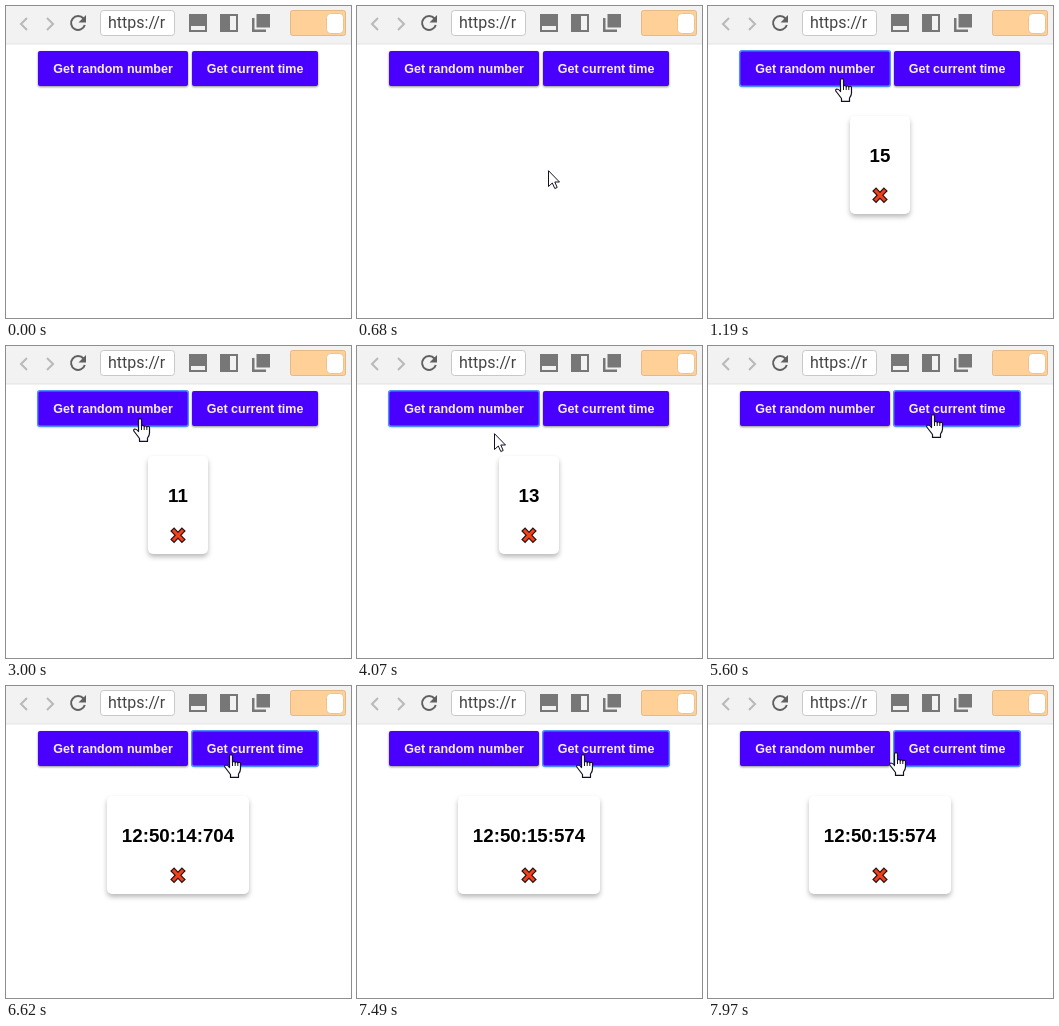
These frames come from a looping animation (345x312 px, 8000 ms). An HTML page:

```html
<!DOCTYPE html>
<html lang="en">
<head>
<meta charset="utf-8">
<style>
  html, body { margin: 0; width: 100%; height: 100%; overflow: hidden; background: #fff; }
  svg { display: block; }
  text { font-family: "Liberation Sans", Arial, sans-serif; font-weight: bold; }
  .url { font: 16px Roboto, sans-serif; fill: #444; }
  .button rect { fill: #4900ff; filter: drop-shadow(0 1px 1.2px rgba(0,0,0,.45)); }
  .button text { font-size: 12.5px; fill: #f3efff; }
  .ring { fill: none; stroke: #4d90fe; stroke-width: 1.4; }
  #card { fill: #fff; filter: drop-shadow(0 3px 2.5px rgba(0,0,0,.27)); }
  #value { font-size: 18.72px; text-anchor: middle; }
  .pointer { fill: #fff; stroke: #111122; stroke-linejoin: round; }
</style>
</head>
<body>
<svg width="345" height="312" viewBox="0 0 345 312">
  <g id="toolbar">
    <path fill="#f2f2f2" d="M0 0H345V38H0z"/>
    <path fill="#e3e3e3" d="M0 37.5H345V38.5H0z"/>
    <g fill="none" stroke-width="2">
      <path stroke="#b9b9b9" d="M21 12l-6 6 6 6M41 12l6 6-6 6"/>
      <path stroke="#606060" d="M77.5 12.5A7 7 0 1 0 78.8 19"/>
    </g>
    <path fill="#606060" d="M80 9v7.5h-7.5z"/>
    <rect x="94.5" y="4.5" width="74" height="25" rx="3" fill="#fff" stroke="#c8c8c8"/>
    <text class="url" x="102" y="22">https://r</text>
    <g fill="#777">
      <path fill-rule="evenodd" d="M183 8h18v18h-18zM185 20v4h14v-4z"/>
      <path fill-rule="evenodd" d="M214 8h18v18h-18zM224 10v14h6V10z"/>
      <path d="M250.500 8H264v13.500h-13.500zM246 12h2.500v11.500H260V26H246z"/>
    </g>
    <rect x="284.500" y="4.500" width="55" height="25" rx="2" fill="#ffd199" stroke="#e3b987"/>
    <rect x="320.500" y="7.500" width="17" height="20" rx="4" fill="#fff" stroke="#edc28d"/>
  </g>

  <g class="button">
    <rect x="32" y="45" width="150" height="35" rx="2"/>
    <text x="47.300" y="67">Get random number</text>
  </g>
  <g class="button">
    <rect x="186" y="45" width="126" height="35" rx="2"/>
    <text x="200.800" y="67">Get current time</text>
  </g>
  <rect class="ring" id="randomRing" x="31.700" y="44.700" width="150.600" height="35.600" rx="2"/>
  <rect class="ring" id="timeRing" x="185.700" y="44.700" width="126.600" height="35.600" rx="2"/>

  <g id="popup">
    <rect id="card" y="110" height="98" rx="5"/>
    <text id="value" x="172" y="156"></text>
    <rect id="closeRing" x="157" y="179" width="30" height="19" rx="1" fill="none" stroke="#9dc2fb" stroke-width="2"/>
    <g stroke-linecap="square">
      <path stroke="#28130f" stroke-width="5.400" d="M168 185l8 8.500M176 185l-8 8.500"/>
      <path stroke="#f0401c" stroke-width="3" d="M168 185l8 8.500M176 185l-8 8.500"/>
    </g>
  </g>

  <g id="cursor">
    <path class="pointer" id="arrow" d="M.5.700V16.500L4.300 13 6.800 18.500 9.200 17.500 6.800 12H11.500z"/>
    <g class="pointer" id="hand" transform="translate(-5)">
      <path stroke-width="1.200" d="M5.500 13.500V2.200a1.500 1.500 0 0 1 3 0V8.500a1.350 1.350 0 0 1 2.700.3a1.350 1.350 0 0 1 2.600.5a1.350 1.350 0 0 1 2.700.8V15q0 2.500-2 5V23.400H6.500V20.500Q5 18.500 3.500 16.500L.8 13q-.5-1.900 1.200-2 1.500 0 3.500 2.500z"/>
      <path fill="none" d="M8.500 8v4M11.200 8.800V12M13.800 9.500V12"/>
    </g>
  </g>
</svg>
<script>
const LOOP = 8000;
const $ = id => document.getElementById(id);
const show = (id, on) => $(id).style.display = on ? "" : "none";

// Moves of the pointer hotspot: start, end, from, to
const moves = [
  [320, 960, [277, 300], [132, 72]],
  [3940, 4540, [132, 72], [176, 193]],
  [4910, 5320, [176, 193], [223, 68]],
  [7279, 7280, [223, 68], [224, 68]],
  [7700, 7970, [224, 68], [186, 66]]
];
const rolls = [[1190, 15], [1880, 11], [2280, 17], [3000, 11], [3380, 18], [3690, 13]];
const clockTicks = [5650, 5960, 6290, 6620, 6900, 7230, 7490];

const latest = (list, t) => list.filter(item => [item].flat()[0] <= t).pop();

function pointerAt(t) {
  const [start, end, from, to] = latest(moves, t) || moves[0];
  const p = Math.max(0, Math.min(1, (t - start) / (end - start)));
  const eased = p * p * (3 - 2 * p);
  return from.map((a, i) => Math.round(a + (to[i] - a) * eased));
}

function clockText(tick) {
  const ms = 15574 + tick - 7490;
  return `12:50:${Math.floor(ms / 1000)}:${String(ms % 1000).padStart(3, "0")}`;
}

function render(t) {
  const isRandom = t >= 1190 && t < 4680, isClock = t >= 5650;
  const popup = isRandom || isClock;
  show("randomRing", t >= 1160 && t < 4580);
  show("closeRing", t >= 4580 && t < 4680);
  show("timeRing", t >= 5600);
  show("popup", popup);
  if (popup) {
    const width = isClock ? 142 : 60;
    $("card").setAttribute("x", 172 - width / 2);
    $("card").setAttribute("width", width);
    $("value").textContent = isClock ? clockText(latest(clockTicks, t)) : latest(rolls, t)[1];
  }

  const [x, y] = pointerAt(t);
  const inside = (l, top, r, b) => x >= l && x <= r && y >= top && y <= b;
  const clickable = inside(32, 45, 181, 80) || inside(186, 45, 312, 80) ||
    popup && inside(156, 178, 188, 199);
  show("cursor", t >= 320);
  show("hand", clickable);
  show("arrow", !clickable);
  $("cursor").setAttribute("transform", `translate(${x} ${y})`);
}

function tick() {
  render(performance.now() % LOOP);
  requestAnimationFrame(tick);
}
tick();
</script>
</body>
</html>
```
